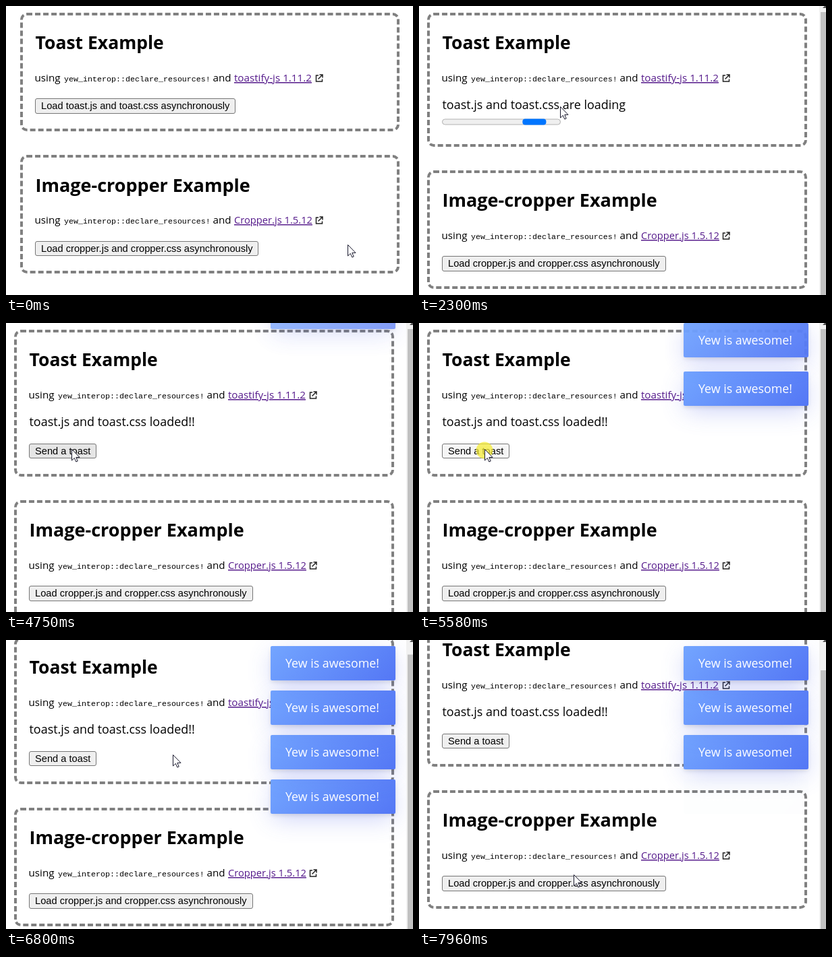
An HTML page that plays this animation: 603x429 px, repeating every 8000 ms.

```html
<!DOCTYPE html>
<html lang="en">
<head>
<meta charset="utf-8">
<title>Toast and cropper demo</title>
<style>
  html, body { margin: 0; width: 603px; height: 429px; overflow: hidden; background: #fff; }
  #stage { position: relative; width: 603px; height: 429px; overflow: hidden; }
  #page { position: absolute; inset: 0; }
  .card { position: absolute; box-sizing: border-box; border: 4px dashed gray; border-radius: 10px; }
  .card svg, #overlay { position: absolute; left: 0; top: 0; overflow: visible; }
  text { font: 15.2px "Open Sans", "Noto Sans", sans-serif; white-space: pre; }
  .title { font-weight: 700; }
  .status { font-size: 17.95px; }
  .code { font: 11.67px "Liberation Mono", monospace; }
  .link { fill: #551a8b; text-decoration: underline; }
  .icon { fill: none; stroke: #222; stroke-width: 1.5; }
  .button rect { fill: #efefef; stroke: #767676; }
  .button text { font: 14.667px "Liberation Sans", Arial, sans-serif; }
  .toast {
    position: absolute; left: 392px; top: 0; width: 163px; height: 51px; padding-left: 22px;
    font: 17.8px/51px "Open Sans", "Noto Sans", sans-serif; color: #fff; white-space: nowrap;
    background: linear-gradient(135deg, #73a5ff, #5477f5); border-radius: 2px;
    box-shadow: 0 3px 6px -1px rgba(0, 0, 0, .12), 0 10px 36px -4px rgba(77, 96, 232, .3);
  }
</style>
</head>
<body>
<div id="stage">
  <div id="page"></div>
  <div id="toasts"></div>
  <svg id="overlay" width="603" height="429">
    <g id="scrollbar">
      <rect x="593" width="10" height="429" fill="#f1f1f1"/>
      <path d="M598 3L602-1 606 3Z" fill="#505050"/>
      <rect id="thumb" x="595" width="8" height="429" fill="#c1c1c1"/>
    </g>
    <g id="cursor">
      <circle id="press" cy="2" r="12.5" fill="#f5eb32" opacity=".72"/>
      <path d="M.5.5V17L4.3 13.4 6.8 19 9.2 18 6.8 12.4H12Z" fill="#fff" stroke="#1a1a2e"/>
    </g>
  </svg>
</div>
<script>
const LOOP = 8000, LOADING = 1230, LOADED = 3250;
const TOASTS = [4614, 5327, 5600, 5806];
const LIFE = 3000, FADE = 400;
const PRESSES = [LOADING, ...TOASTS];
const BORDER = 4, INDENT = 22.2, BUTTON_HEIGHT = 22.6;
const CARD_WIDTH = 562.5, CARD_HEIGHT = 176.3, CARD_GAP = 35.2, CARD_TOP = 9.6;

// [time, x, y] of the pointer tip
const POINTER = [
  [0, 506, 354], [840, 210, 153], [970, 209, 149], [3180, 209, 149], [3380, 203, 142],
  [3700, 203, 142], [4190, 97, 187], [5930, 97, 187], [6070, 126, 187], [6140, 161, 185],
  [6410, 247, 170], [7500, 247, 170], [7960, 229, 348]
];
const SCROLL = [[0, 0], [6640, 0], [6800, 14], [6940, 40]];

const $ = id => document.getElementById(id);
const show = (el, on) => { el.style.display = on ? '' : 'none'; };
const clamp = v => Math.min(1, Math.max(0, v));
const easeOut = v => 1 - (1 - clamp(v)) ** 3;
const { round } = Math;

function along(keys, t) {
  const i = keys.findIndex(k => k[0] > t);
  if (i < 0) return keys[keys.length - 1].slice(1);
  const [a, b] = [keys[i - 1], keys[i]];
  const p = (t - a[0]) / (b[0] - a[0]);
  const s = p * p * (3 - 2 * p);
  return a.slice(1).map((v, n) => v + (b[n + 1] - v) * s);
}

// data-y is the row's offset from the top of its card
const row = (y, body) => `<g data-y="${y}">${body}</g>`;

const button = (id, y, width, label) => `
  <g class="button" id="${id}" data-y="${y}">
    <rect y=".5" rx="2.5" data-width="${width}"/>
    <text x="27" y="16">${label}</text>
  </g>`;

const status = label => row(143.4, `<text class="status" x="18.5">${label}</text>`);

const card = (id, title, titleSize, link, linkSize, body) => `
  <div class="card" id="${id}"><svg width="1" height="1">
    ${row(54.6, `<text class="title" x="18.5" style="font-size:${titleSize}px">${title}</text>`)}
    ${row(102.2, `
      <text x="17.5">using</text>
      <text class="code" x="61">yew_interop::declare_resources!</text>
      <text x="281.5">and</text>
      <text class="link" x="313" style="font-size:${linkSize}px">${link}</text>
      <path class="icon" transform="translate(433 -11)"
        d="M5 2H1.5V11H10.5V7.5M6.5 1H11V5.5M11 1L4.5 7.5"/>`)}
    ${body}
  </svg></div>`;

$('page').innerHTML =
  card('toastCard', 'Toast Example', 26.5, 'toastify-js 1.11.2', 15.2, `
    ${button('load', 127.6, 297, 'Load toast.js and toast.css asynchronously')}
    <g id="loading">
      ${status('toast.js and toast.css are loading')}
      ${row(158, `
        <rect x="18.5" width="175" height="8" rx="4" fill="#efefef" stroke="#b2b2b2"/>
        <rect id="chunk" y="-.5" width="35" height="9" rx="4" fill="#0075ff"/>`)}
    </g>
    <g id="loaded">
      ${status('toast.js and toast.css loaded!!')}
      ${button('send', 169.1, 99.4, 'Send a toast')}
    </g>`) +
  card('cropCard', 'Image-cropper Example', 27, 'Cropper.js 1.5.12', 14.7,
    button('loadCrop', 127.6, 331.4, 'Load cropper.js and cropper.css asynchronously'));

$('toasts').innerHTML = TOASTS.map(() => '<div class="toast">Yew is awesome!</div>').join('');
const toasts = [...$('toasts').children];

// lays out a card at fractional coordinates, snapping every edge to whole pixels
function place(el, left, top, height) {
  const x0 = round(left), y0 = round(top);
  Object.assign(el.style, {
    left: x0 + 'px', width: round(left + CARD_WIDTH) - x0 + 'px',
    top: y0 + 'px', height: round(top + height) - y0 + 'px'
  });
  for (const part of el.querySelectorAll('[data-y]')) {
    const y = top + +part.dataset.y;
    part.setAttribute('transform', `translate(0 ${round(y) - y0 - BORDER})`);
    const box = part.querySelector('[data-width]');
    if (!box) continue;
    const x = left + INDENT;
    box.setAttribute('x', round(x) - x0 - BORDER + .5);
    box.setAttribute('width', round(x + +box.dataset.width) - round(x) - 1);
    box.setAttribute('height', round(y + BUTTON_HEIGHT) - round(y) - 1);
  }
}

function draw(t) {
  const started = t >= LOADING, done = t >= LOADED;
  const height = CARD_HEIGHT + (done ? 41.7 : started ? 22.6 : 0);
  const left = started ? 12.2 : 20.7;
  place($('toastCard'), left, CARD_TOP, height);
  place($('cropCard'), left, CARD_TOP + height + CARD_GAP, CARD_HEIGHT);
  show($('load'), !started);
  show($('loading'), started && !done);
  show($('loaded'), done);
  show($('scrollbar'), started);

  // indeterminate bar bounces between both ends
  $('chunk').setAttribute('x', 18.5 + 140 - Math.abs(140 - .111 * (t - LOADING)));

  const scroll = round(along(SCROLL, t)[0]);
  $('page').style.transform = `translateY(${-scroll}px)`;
  $('thumb').setAttribute('y', 9 + scroll * .9);

  const [x, y] = along(POINTER, t).map(round);
  const pressed = PRESSES.some(end => t >= end - 110 && t < end);
  $('cursor').setAttribute('transform', `translate(${x} ${y})`);
  show($('press'), pressed);
  const shade = over => pressed ? '#f5f5f5' : over ? '#e5e5e5' : '#efefef';
  $('load').firstElementChild.style.fill = shade(x < 340 && y < 160);
  $('send').firstElementChild.style.fill = shade(x < 134 && y > 178 && y < 201);

  // each new toast drops in on top and pushes the older ones down
  const rise = TOASTS.map(s => easeOut((t - s) / FADE));
  toasts.forEach((el, i) => {
    const pushed = rise.slice(i + 1).reduce((sum, r) => sum + 66 * r, 0);
    const gone = easeOut((t - TOASTS[i] - LIFE) / FADE);
    el.style.transform = `translateY(${round(-171 + 180 * rise[i] + pushed)}px)`;
    el.style.opacity = rise[i] * (1 - gone);
  });
}

const begin = performance.now();
function tick() {
  draw((performance.now() - begin) % LOOP);
  requestAnimationFrame(tick);
}
tick();
</script>
</body>
</html>
```
